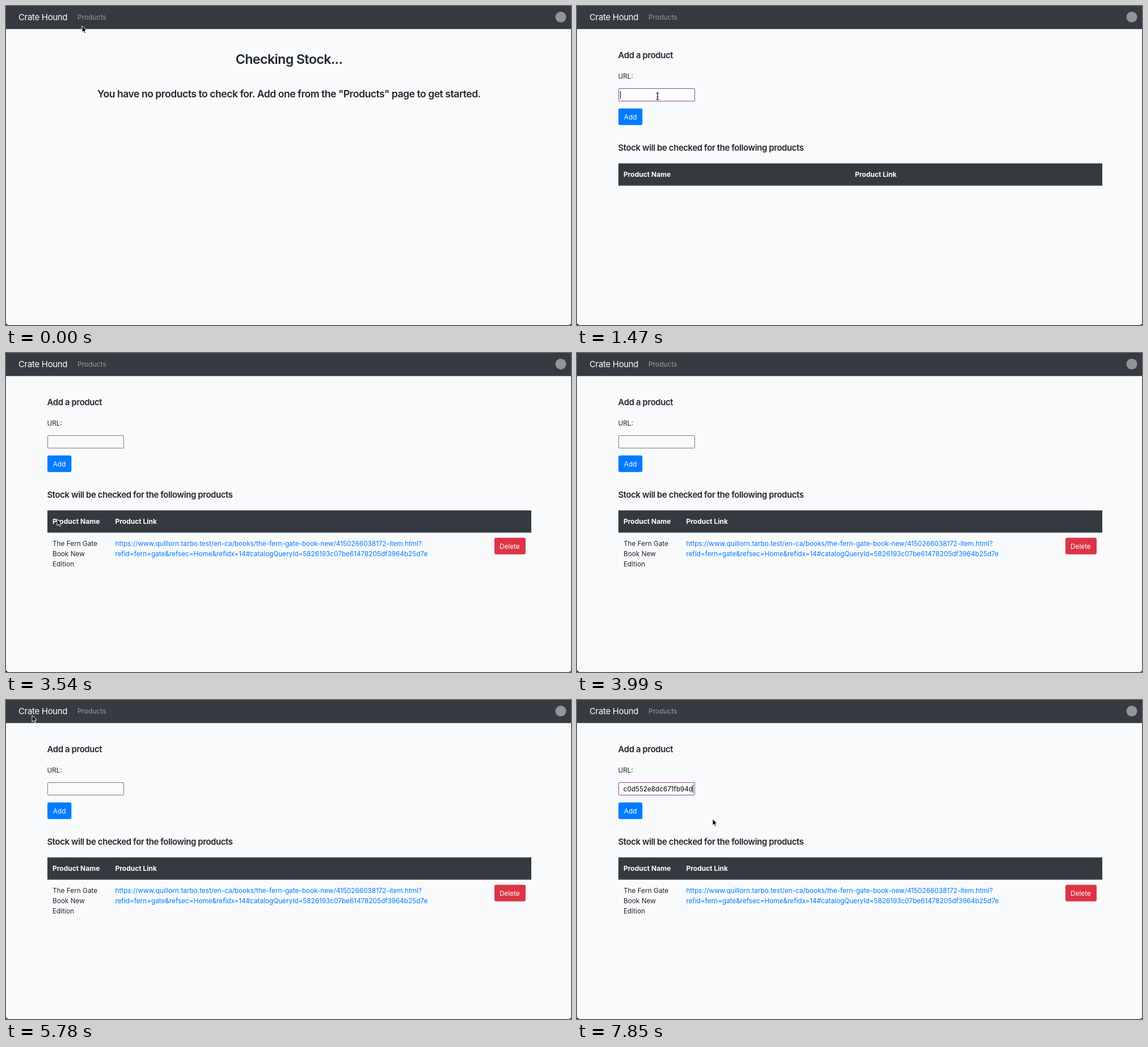
These frames come from a looping animation (996 by 562 pixels, 8000 ms). An HTML page:

```html
<!DOCTYPE html>
<html lang="en">
<head>
<meta charset="utf-8">
<title>Stock page</title>
<style>
html, body { margin: 0; width: 100%; height: 100%; overflow: hidden; background: #f8fafc; }
svg { display: block; }
text { font: 11.8px Inter, "Open Sans", sans-serif; fill: #212529; white-space: pre; }
.h2, .h4, .h5 { font-weight: 600; letter-spacing: -.025em; }
.h2 { font-size: 23.2px; text-anchor: middle; }
.h4 { font-size: 17.5px; text-anchor: middle; }
.h5 { font-size: 14.9px; }
.brand { font-size: 14.9px; letter-spacing: -.018em; }
.nav { font-size: 12px; }
.th { font-size: 12px; font-weight: 700; }
.brand, .th, .white { fill: #fff; }
.small { font-size: 9px; }
.link { font-size: 11.75px; fill: #007bff; }
.field { font-size: 11.7px; fill: #000; }
</style>
</head>
<body>
<svg width="996" height="562" viewBox="0 0 996 562">
  <defs>
    <linearGradient id="fade" x2="0" y2="1">
      <stop stop-opacity=".52"/>
      <stop offset=".5" stop-opacity=".22"/>
      <stop offset="1" stop-opacity="0"/>
    </linearGradient>
    <clipPath id="inner"><rect x="76" y="147" width="129.5" height="20"/></clipPath>
  </defs>

  <rect width="996" height="562" fill="#f8fafc"/>
  <rect width="996" height="40.6" fill="#363b42"/>
  <text class="brand" x="22" y="24.5">Crate Hound</text>
  <text id="nav" class="nav" x="126" y="23.8">Products</text>
  <circle cx="978" cy="19.5" r="9.5" fill="#929598"/>
  <rect id="shade" width="996" height="40" fill="url(#fade)"/>

  <g id="home">
    <text class="h2" x="499" y="101.5">Checking Stock...</text>
    <text class="h4" x="499" y="161">You have no products to check for. Add one from the "Products" page to get started.</text>
  </g>

  <g id="list">
    <text class="h5" x="72.5" y="92.2">Add a product</text>
    <text x="72.5" y="128.3">URL:</text>
    <rect id="box" x="73.5" y="145.5" width="134" height="22" rx="1.5"/>
    <g clip-path="url(#inner)">
      <text id="head" class="field" x="76" y="161">https://www.quillorn.tarbo.test</text>
      <text id="tail" class="field" x="204" y="161" text-anchor="end"></text>
    </g>
    <rect id="caret" y="150" width="1" height="13.5"/>
    <rect id="ring" x="70.5" y="178" width="47.5" height="34.5" rx="5" fill="#8dc2fb"/>
    <rect id="add" x="73" y="180.4" width="42.3" height="29.3" rx="3"/>
    <text class="white" x="82.8" y="199.6">Add</text>
    <text class="h5" x="72.5" y="255">Stock will be checked for the following products</text>
    <rect x="73" y="277.3" width="853" height="39" fill="#343a40"/>
    <rect x="73" y="315" width="853" height="1.5" fill="#454d55"/>
    <text class="th" x="82" y="301">Product Name</text>
    <text id="linkHead" class="th" y="301">Product Link</text>
    <g id="row">
      <text x="82" y="339.5">The Fern Gate</text>
      <text x="82" y="358">Book New</text>
      <text x="82" y="376.4">Edition</text>
      <text class="link" x="192.5" y="339.5">https://www.quillorn.tarbo.test/en-ca/books/the-fern-gate-book-new/4150266038172-item.html?</text>
      <text class="link" x="192.5" y="358">refid=fern+gate&amp;refsec=Home&amp;refidx=14#catalogQueryId=5826193c07be61478205df3964b25d7e</text>
      <rect x="861" y="325.4" width="55" height="29.3" rx="3" fill="#dc3545"/>
      <text class="white" x="870" y="344.6">Delete</text>
    </g>
  </g>

  <path d="M0 558.5Q1 562 6 562H0ZM996 559.5Q995 562 991 562H996Z"/>
  <g id="status">
    <path d="M0 546H131Q133 546 133 548V562H0Z" fill="#1567c3"/>
    <text class="small white" x="2" y="557.3">hound.test:4100/wares_lookup</text>
  </g>

  <g id="cursor" stroke-linejoin="round">
    <path id="arrow" d="M0 0V11.5L2.6 9.1L4.4 13.2L6.4 12.3L4.6 8.3H8.2Z" stroke="#fff"/>
    <path id="hand" d="M-1.3 1Q0-.8 1.2 1V4.6Q2.6 3.8 3.2 5Q4.6 4.4 5.2 5.7Q6.7 5.4 6.7 7V9Q6 10.3 5.7 11.8H0Q-1 9.8-3.3 7.2Q-4 5.6-2.5 6L-1.3 7Z" fill="#fff" stroke="#000"/>
    <path id="beam" d="M-2.5-6Q0-6 0-4.5Q0-6 2.5-6M0-4.5V4.5M-2.5 6Q0 6 0 4.5Q0 6 2.5 6M-1.5 1H1.5" fill="none" stroke="#000" stroke-width="1.2"/>
  </g>
</svg>
<script>
const LOOP = 8000;
const $ = id => document.getElementById(id);
const show = (id, on) => $(id).style.display = on ? "" : "none";
const within = (v, a, b) => v >= a && v < b;

// Pointer moves: first step, last step, number of steps, end x and y
const moves = [
  [0, 0, 1, 134, 35],
  [140, 290, 2, 153.5, 26.5],
  [890, 1470, 5, 142, 159],
  [2060, 2360, 3, 100, 203.5],
  [3540, 3840, 3, 70, 470],
  [5340, 5340, 1, 94.5, 117.5],
  [5490, 5490, 1, 88, 143],
  [5640, 5780, 2, 46, 27],
  [6070, 6660, 5, 142, 159],
  [7100, 7400, 3, 239, 209.5]
];

function pointer(t) {
  let x = 0, y = 0;
  for (const [a, b, n, endX, endY] of moves) {
    if (t < a) break;
    const step = t >= b ? n : Math.floor((t - a) / (b - a) * (n - 1)) + 1;
    x += (endX - x) * step / n;
    y += (endY - y) * step / n;
  }
  return [x, y];
}

function draw(t) {
  const listed = t >= 590, added = t >= 3540;
  const focus = within(t, 1470, 2800) || t >= 6810;
  const pasted = within(t, 1910, 2800) || t >= 7850;
  const clicked = within(t, 2800, 3540);
  const [x, y] = pointer(t);
  const onAdd = listed && within(x, 73, 116) && within(y, 180, 210);
  const onLink = within(x, 120, 182) && within(y, 8, 33);
  const onField = listed && within(x, 73, 208) && within(y, 145, 168);

  show("home", !listed);
  show("list", listed);
  show("row", added);
  show("status", within(t, 590, 1030));
  show("shade", within(t, 4440, 5490));
  $("nav").style.fill = within(t, 140, 590) ? "#cccecf" : "#9b9da0";
  $("linkHead").setAttribute("x", added ? 192.5 : 490);

  $("box").style.fill = focus || clicked ? "#fff" : "#f8fafc";
  $("box").style.stroke = focus ? "#8a4497" : "#77797b";
  show("head", clicked);
  show("tail", pasted);
  $("tail").textContent = added ? "c0d552e8dc671fb94d" : "61478205df3964b25d7e";
  show("caret", focus && !within(t, 7250, 7850));
  $("caret").setAttribute("x", pasted ? 204 : 76);
  show("ring", clicked);
  $("add").style.fill = onAdd && !added ? "#0069d9" : "#007bff";

  show("cursor", !within(t, 3990, 5340));
  $("cursor").setAttribute("transform", `translate(${x} ${y})`);
  show("hand", onAdd || onLink);
  show("beam", onField);
  show("arrow", !onAdd && !onLink && !onField);
}

const start = performance.now();
function tick() {
  draw((performance.now() - start) % LOOP);
  requestAnimationFrame(tick);
}
draw(0);
requestAnimationFrame(tick);
</script>
</body>
</html>
```
